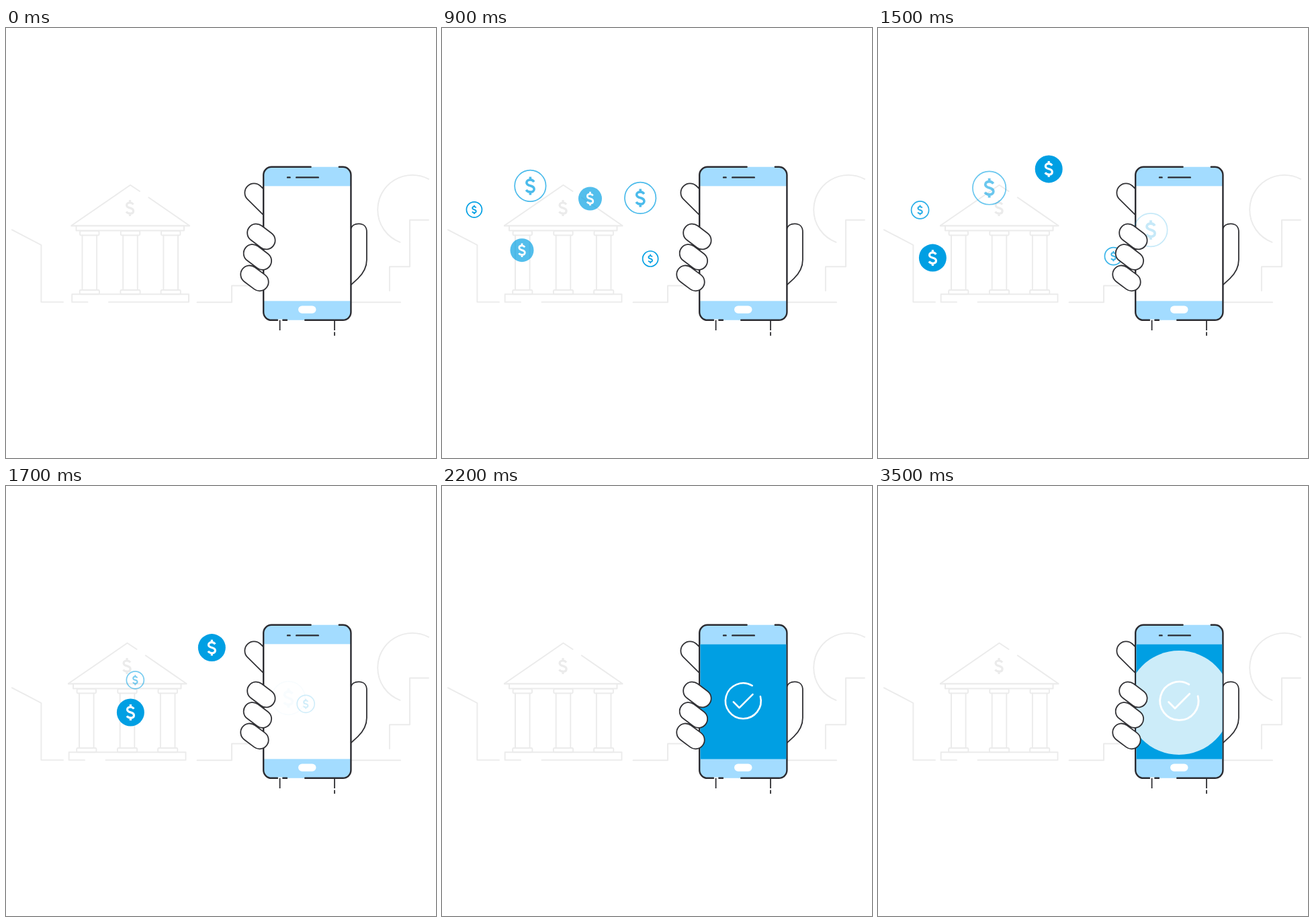
Recreate the animation shown at these times as an HTML page. Size 640x640 px, loop 3600 ms.

```html
<!DOCTYPE html>
<html lang="en">
<head>
<meta charset="utf-8">
<title>Mobile banking</title>
<style>
  html, body { margin: 0; width: 100%; height: 100%; overflow: hidden; background: #fff; }
  svg { display: block; width: 100vw; height: 100vh; }
  .pale { fill: none; stroke: #ebebeb; stroke-width: 1.9; stroke-linecap: round; stroke-linejoin: round; }
  .hand { fill: #fff; stroke: #303034; stroke-width: 1.8; stroke-linejoin: round; }
  .edge { fill: none; stroke: #2b2b30; stroke-width: 2.4; stroke-linecap: round; }
  .check { fill: none; stroke: #fff; stroke-width: 2.6; stroke-linecap: round; stroke-linejoin: round; }
  .ring { fill: none; stroke: #009fe3; stroke-width: 1.7; vector-effect: non-scaling-stroke; }
  .sign { fill: none; stroke-width: 3.2; }
</style>
</head>
<body>
<svg viewBox="0 0 640 640">
  <defs>
    <path id="dollar" d="M5-5.3C3.6-7.3 1.9-8 0-8C-3-8-4.9-6.4-4.9-4.2C-4.9-1.6-2.5-.8 0-.1C2.7.6 5.1 1.6 5.1 4.3C5.1 6.8 3 8.2.2 8.2C-2.3 8.2-4.2 7.2-5.5 5.4M0-12V-8M0 8V12"/>
    <g id="column">
      <rect x="-14.2" y="302" width="28.4" height="6.5" rx="1.5"/>
      <path d="M-10.8 308.5V390M10.8 308.5V390"/>
      <rect x="-14.6" y="390" width="29.2" height="6.3" rx="1.5"/>
    </g>
    <rect id="finger" x="-22.6" y="-13.3" width="45.2" height="26.6" rx="13.3" transform="rotate(37)"/>
    <clipPath id="screen"><rect x="384.4" y="235.5" width="128" height="171"/></clipPath>
  </defs>

  <g class="pale">
    <path d="M9 300.3L52.4 323V407.9H85M284.5 408.3H336V383.5H383M514 408.3H587"/>
    <path d="M629 224.9A51.6 51.6 0 0 0 553.2 270.5A51.6 51.6 0 0 0 586.5 318.8M629 285.8H601V355.3H570.9V391"/>
  </g>

  <g id="bank" class="pale">
    <path d="M194.5 243L180.5 233.8L93 294M207.8 252.2L268.3 294"/>
    <path d="M93 294.4H268.3" stroke-width="2.4"/>
    <path d="M100 295V301.5H260.5V295"/>
    <use href="#column" x="119.8"/>
    <use href="#column" x="180.5"/>
    <use href="#column" x="240.7"/>
    <path d="M117 407.9H93.7V396.3H267.5V407.9H148.5"/>
    <use href="#dollar" class="sign" stroke-linecap="butt" x="180" y="268"/>
  </g>

  <path class="hand" d="M383.2 239.5L378.6 235A13.8 13.8 0 0 0 359 254.4L383.2 278.4"/>
  <path class="hand" d="M513.4 298.5C515 293.8 519 291.4 525 291.4C532.5 291.4 536.9 296 536.9 303.5V345C536.9 357 530.5 366.5 523.5 373.2L513.4 382.3"/>

  <rect x="383.2" y="206.8" width="130.2" height="228" rx="12" fill="#a3dcff"/>
  <rect x="383.2" y="235.3" width="130.2" height="171" fill="#fff"/>
  <path d="M404.5 434.8H411.5" stroke="#fff" stroke-width="2.6"/>
  <rect x="435" y="413.5" width="26.5" height="11.2" rx="5.6" fill="#fff"/>
  <path class="hand" d="M407.6 434.8V450M489 435.5V450M489 452.5V458"/>
  <path class="edge" d="M453.6 206.8H395.2A12 12 0 0 0 383.2 218.8V422.8A12 12 0 0 0 395.2 434.8H404M412.3 434.8H418M445.2 434.8H501.4A12 12 0 0 0 513.4 422.8V218.8A12 12 0 0 0 501.4 206.8H495.8"/>
  <path class="edge" d="M419 222.4H422.6M432.2 222.4H464.8"/>

  <g id="coins"></g>

  <g clip-path="url(#screen)">
    <circle id="fill" cx="448.3" cy="320" fill="#009fe3"/>
    <circle id="flash" cx="448" cy="322.5" fill="#fff"/>
    <g id="check" class="check">
      <path d="M25.8-6.4A26.4 26.4 0 1 1 13.6-22.6"/>
      <path d="M-14.3 1.6L-5.6 10.4L14.4-9.6"/>
    </g>
  </g>

  <g class="hand">
    <use href="#finger" x="379.9" y="310.5"/>
    <use href="#finger" x="374.4" y="341"/>
    <use href="#finger" x="370" y="372.4"/>
  </g>
</svg>

<script>
const LOOP = 3600, STEP = 100, BLUE = '#009fe3';
const BANK = { x: 180, y: 315 }, PHONE = { x: 448, y: 324 };

// reach, grow and show: share of distance, size and opacity gained early in the burst
const small = { r: 13, reach: .95, grow: .885, show: .99 };
const large = { r: 24.7, reach: .9, grow: .94, show: .7 };
const solid = { r: 20.5, reach: .57, grow: .855, show: .67, solid: true };

// x, y: place after the burst; go, time: flight to the phone; fade: how fast it dims
const coins = [
  { kind: small, x: 41, y: 268, go: 1398, time: 730, fade: 1.2 },
  { kind: large, x: 126, y: 226, go: 1427, time: 333, fade: 2.2 },
  { kind: solid, x: 251, y: 208, go: 1445, time: 730, fade: 0 },
  { kind: large, x: 308, y: 246, go: 1288, time: 333, fade: 1.5 },
  { kind: solid, x: 73, y: 342.5, go: 1435, time: 730, fade: 0 },
  { kind: small, x: 317, y: 345, go: 1390, time: 333, fade: .65 }
];

const $ = id => document.getElementById(id);
const mix = (a, b, p) => a + (b - a) * p;
const span = (t, from, length) => Math.min(1, Math.max(0, (t - from) / length));
const smooth = u => u * u * (3 - 2 * u);

for (const c of coins) {
  const { r, solid } = c.kind;
  const face = solid ? `fill="${BLUE}"` : 'class="ring"';
  c.el = document.createElementNS('http://www.w3.org/2000/svg', 'g');
  c.el.innerHTML = `<circle r="${r}" ${face}/>
    <use href="#dollar" class="sign" stroke="${solid ? '#fff' : BLUE}" transform="scale(${r * .0485})"/>`;
  $('coins').append(c.el);
}

function set(el, on, attrs) {
  el.style.display = on ? '' : 'none';
  for (const name in attrs) el.setAttribute(name, attrs[name]);
}

function drawCoin(c, t) {
  const k = c.kind;
  const age = ((t - 700) / 200) ** 2;
  const gain = share => 1 - (1 - share) ** age;
  const u = span(t, c.go, c.time), fly = smooth(u);
  const x = mix(mix(BANK.x, c.x, gain(k.reach)), PHONE.x, fly);
  const y = mix(mix(BANK.y, c.y, gain(k.reach)), PHONE.y, fly);
  set(c.el, t >= 800 && u < 1, {
    transform: `translate(${x} ${y}) scale(${gain(k.grow)})`,
    opacity: gain(k.show) * (1 - u) ** c.fade
  });
}

// Damped shake; the bank waits off centre before it starts
function shake(t) {
  if (t < 200) return 4.5;
  return 9.4 * (1 - span(t, 200, 500)) ** 2 * Math.cos(2 * Math.PI * (t - 200) / 520);
}

function draw(t) {
  $('bank').setAttribute('transform', `translate(${shake(t)} 0)`);
  coins.forEach(c => drawCoin(c, t));

  const pulse = span(t, 3300, 200);
  const size = mix(.5, 1, span(t, 2000, 200)) + .085 * pulse;
  set($('fill'), t >= 2000, { r: mix(30, 120, span(t, 2000, 200)) });
  set($('check'), t >= 2100, { transform: `translate(448.1 319.7) scale(${size})` });
  set($('flash'), pulse > 0, { r: 77.5 * pulse, opacity: .8 * pulse });
}

const start = performance.now();
function tick() {
  const t = (performance.now() - start) % LOOP;
  draw(Math.floor(t / STEP) * STEP);
  requestAnimationFrame(tick);
}
tick();
</script>
</body>
</html>
```
